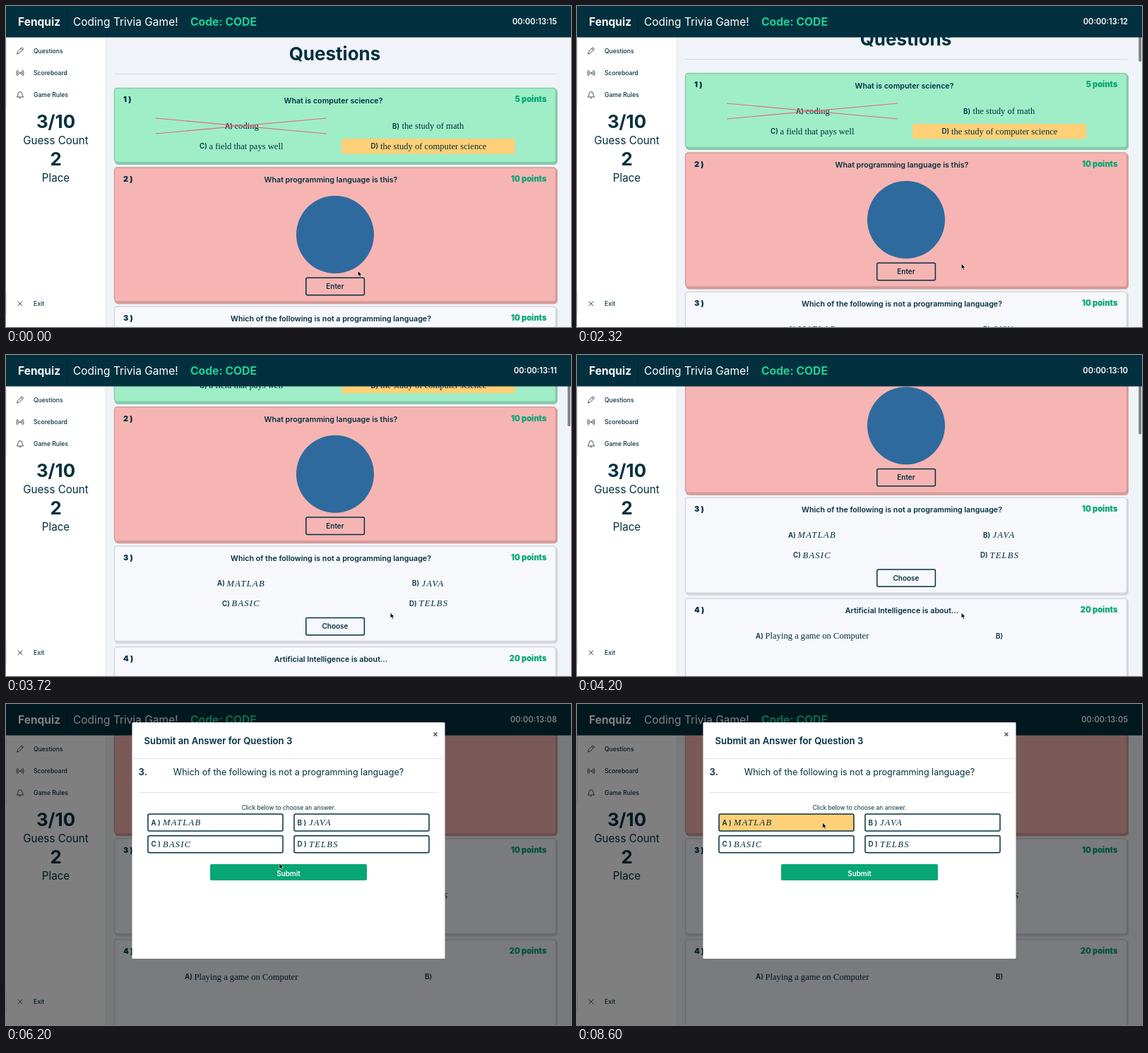
An HTML page for the animation above (8.64 s loop, 800 by 455 pixels).

```html
<!DOCTYPE html>
<html lang="en">
<head>
<meta charset="utf-8">
<title>Trivia game</title>
<style>
html, body { margin: 0; width: 100%; height: 100%; overflow: hidden; background: #f0f3f7; }
svg { display: block; width: 800px; height: 455px; }
text { font-family: Inter, "Open Sans", sans-serif; fill: #03303f; white-space: pre; }
.math { font-family: "Liberation Serif", "Noto Serif", serif; font-size: 12.6px; }
.var { font-style: italic; letter-spacing: 1.2px; }
.icon { fill: none; stroke: #333f45; stroke-width: .9; stroke-linecap: round; stroke-linejoin: round; }
</style>
</head>
<body>
<svg id="stage" viewBox="0 0 800 455"></svg>
<script>
const NAVY = '#03303f', GREEN = '#07a674', AMBER = '#ffd077';
const LOOP = 8640, OPEN_AT = 5140, PICK_AT = 6900;

const rect = (x, y, w, h, fill, extra = '') =>
  `<rect x="${x}" y="${y}" width="${w}" height="${h}" fill="${fill}" ${extra}/>`;
const path = (d, extra = '') => `<path d="${d}" ${extra}/>`;
// y is the middle of the capital letters
const text = (s, x, y, size, weight = 400, anchor = 'start', extra = '') =>
  `<text x="${x}" y="${y + size * .36}" font-size="${size}" font-weight="${weight}" text-anchor="${anchor}" ${extra}>${s}</text>`;
const math = (s, x, y, italic) =>
  `<text class="math ${italic ? 'var' : ''}" x="${x}" y="${y + 4.1}">${s}</text>`;
const option = (key, s, x, y, italic, gap = 13.5) =>
  text(key, x, y, 9.8, 600) + math(s, x + gap, y, italic);
const button = (s, y) =>
  rect(424.8, y - 12.2, 82.6, 24.4, 'none', `rx="2" stroke="${NAVY}" stroke-width="1.5"`) +
  text(s, 466, y, 10, 600, 'middle');

function card(n, y, h, fill, shade, title, points, titleX = 460) {
  return rect(154, y + 1, 627, h + 1, shade, 'rx="5"') +
    rect(153.5, y + .5, 625, h - 2, fill, `rx="4" stroke="${shade}" stroke-width="1.4"`) +
    text(n + ' )', 166, y + 16.5, 11, 900) +
    text(title, titleX, y + 18, 10.7, 600, 'middle') +
    text(points + ' points', 765.5, y + 16.5, 11.1, 900, 'end', `style="fill:${GREEN}"`);
}

const page = rect(142, 0, 658, 800, '#f0f3f7') +
  text('Questions', 465.5, 67.5, 26, 700, 'middle') +
  rect(153, 96, 626, 1, '#d9dce2') +
  card(1, 116, 107, '#9feec8', '#86c9aa', 'What is computer science?', 5, 463.5) +
  rect(475, 188, 246, 21.5, AMBER, 'rx="2"') +
  option('A)', 'coding', 310, 170) +
  option('B)', 'the study of math', 547, 170) +
  option('C)', 'a field that pays well', 274, 198.5) +
  option('D)', 'the study of computer science', 516.5, 198.5) +
  path('M212 159L454 181M212 181L454 159', 'stroke="#df6a7c" stroke-width="1.2"') +
  card(2, 228.5, 192, '#f6b5b3', '#d59b9b', 'What programming language is this?', 10) +
  '<circle cx="466" cy="324" r="55" fill="#2f6a9e"/>' +
  button('Enter', 397.5) +
  card(3, 425.5, 137, '#f6f8fc', '#d3d7dd', 'Which of the following is not a programming language?', 10) +
  option('A)', 'MATLAB', 299, 479, true) +
  option('B)', 'JAVA', 575, 479, true) +
  option('C)', 'BASIC', 306, 507.5, true) +
  option('D)', 'TELBS', 571, 507.5, true) +
  button('Choose', 540) +
  card(4, 568.5, 190, '#f6f8fc', '#d3d7dd', 'Artificial Intelligence is about...', 20) +
  option('A)', 'Playing a game on Computer', 253, 622) +
  option('B)', '', 593, 622);

const nav = [['Questions', 63.5], ['Scoreboard', 95], ['Game Rules', 126], ['Exit', 422]];
const sidebar = rect(0, 44, 141, 411, '#fff') + rect(141, 44, 1, 411, '#e1e5e9') +
  nav.map(([s, y]) => rect(0, y - 15.5, 1, 31, '#dfe2e5') + text(s, 39, y, 8.6, 500)).join('') +
  `<g class="icon">` +
  path('M15.7 67.7l.8-3 6-6 2.2 2.2-6 6zM21 60.2l2.2 2.2') +
  path('M17.6 92.4q-1.6 2.6 0 5.2M22.4 92.4q1.6 2.6 0 5.2M16 91q-2.6 4 0 8M24 91q2.6 4 0 8') +
  '<circle cx="20" cy="95" r="1"/>' +
  path('M15.5 128.7q1.6-1.2 1.6-4.2a2.9 2.9 0 0 1 5.8 0q0 3 1.6 4.2zM18.9 130.3q1.1 1 2.2 0') +
  path('M17 419l6 6M23 419l-6 6') + '</g>' +
  text('3/10', 70.5, 163.5, 25.8, 700, 'middle') +
  text('Guess Count', 70.5, 190.5, 15.2, 400, 'middle') +
  text('2', 70.5, 217, 25.8, 700, 'middle') +
  text('Place', 70.5, 244, 15.2, 400, 'middle');

const white = 'style="fill:#fff"';
const header = rect(0, 0, 800, 44.5, NAVY) + rect(86, 5, 1, 35, '#02222d') +
  text('Fenquiz', 17, 22, 15.5, 700, 'start', white) +
  text('Coding Trivia Game!', 95, 22, 15.5, 400, 'start', white) +
  text('Code: CODE', 261, 22, 15.7, 700, 'start', 'style="fill:#1ed295"') +
  text('', 780, 22, 11.1, 600, 'end', white + ' id="clock"');

const choice = (key, s, x, y, id = '') =>
  rect(x, y, 191, 24, '#fff', `rx="2" stroke="${NAVY}" stroke-width="1.5" ${id}`) +
  option(key, s, x + 4.5, y + 12, true, 16.5);
const modal = rect(178.5, 26, 443, 335, '#fff', 'rx="1.5"') +
  text('Submit an Answer for Question 3', 195.5, 52, 13.2, 600) +
  path('M605.5 40.5l5 5M610.5 40.5l-5 5', 'stroke="#555" stroke-width="1.5"') +
  rect(178.5, 77, 443, 1, '#dfe2e6') +
  text('3.', 187.5, 96, 13.3, 600) +
  text('Which of the following is not a programming language?', 400, 96, 12.55, 400, 'middle') +
  rect(187.5, 125, 425.5, 1, '#dfe2e6') +
  text('Click below to choose an answer.', 400, 146.5, 8.45, 400, 'middle') +
  choice('A )', 'MATLAB', 201, 156, 'id="pick"') + choice('B )', 'JAVA', 408, 156) +
  choice('C )', 'BASIC', 201, 186.7) + choice('D )', 'TELBS', 408, 186.7) +
  rect(289, 227, 222, 23, GREEN, 'rx="2"') +
  text('Submit', 400, 240, 9.9, 600, 'middle', white);

stage.innerHTML = `<g id="sheet">${page}</g>` +
  rect(795.3, 0, 3.8, 75.5, '#7d8084', 'id="thumb" rx="1.9"') + sidebar + header +
  '<g id="notice">' + rect(7, 431, 91, 13, '#e6e6e6', 'stroke="#959595"') +
  text('Typesetting math: 100%', 12, 437.5, 7) + '</g>' +
  rect(0, 0, 800, 455, '#000', 'id="shade"') + `<g id="dialog">${modal}</g>` +
  path('M0 0v7.6l1.8-1.6 1.3 2.9 1.4-.6-1.2-2.7h2.4z', 'id="pointer" fill="#000" stroke="#fff" stroke-width=".6"');

const part = id => document.getElementById(id);
const clamp = v => Math.max(0, Math.min(1, v));
const smooth = p => p * p * (3 - 2 * p);

// keys: [time, value]; shape bends the progress between two keys
function track(keys, t, shape = p => p) {
  const i = keys.findIndex(k => k[0] > t);
  if (i === 0) return keys[0][1];
  if (i < 0) return keys[keys.length - 1][1];
  const [t0, a] = keys[i - 1], [t1, b] = keys[i];
  return a + (b - a) * shape((t - t0) / (t1 - t0));
}

const SCROLL = [[2000, 0], [2320, 21], [2880, 50.5], [3720, 155.3], [4280, 235.3]];
const POINTER = [[300, 498.3, 375.5], [1700, 544.2, 365.3], [4200, 544.2, 365.3], [4900, 472.8, 310.8],
  [5400, 472.8, 310.8], [6200, 387, 226], [6700, 347.7, 168.3]];
const POINTER_X = POINTER.map(([t, x]) => [t, x]);
const POINTER_Y = POINTER.map(([t, , y]) => [t, y]);
const TICKS = [500, 1300, 2100, 3100, 3900, 4500, 5000, 6600, 7500, 8300];

function draw(now) {
  const t = Math.floor(now % LOOP / 40) * 40;
  const scroll = track(SCROLL, t);
  part('sheet').setAttribute('transform', `translate(0 ${-scroll})`);
  part('thumb').setAttribute('y', scroll * .165);
  part('thumb').setAttribute('opacity', t < 2000 ? 0 : 1 - clamp((t - 4700) / 250));

  const seconds = 15 - TICKS.filter(k => k <= t).length;
  part('clock').textContent = '00:00:13:' + String(seconds).padStart(2, '0');

  // the dialog follows the backdrop by a moment
  const age = t - OPEN_AT, lag = age - 15;
  part('shade').setAttribute('opacity', clamp(age / 150) / 2);
  part('dialog').setAttribute('opacity', clamp(lag / 150));
  part('dialog').setAttribute('transform', `translate(0 ${-28 * (1 - clamp(lag / 300)) ** 1.8})`);
  part('notice').setAttribute('opacity', age < 0 ? 0 : 1 - clamp((t - 5500) / 200));
  part('pick').setAttribute('fill', t < PICK_AT ? '#fff' : AMBER);

  part('pointer').setAttribute('transform',
    `translate(${track(POINTER_X, t, smooth)} ${track(POINTER_Y, t, smooth)})`);
}

const start = performance.now();
function loop() {
  draw(performance.now() - start);
  requestAnimationFrame(loop);
}
loop();
</script>
</body>
</html>
```
